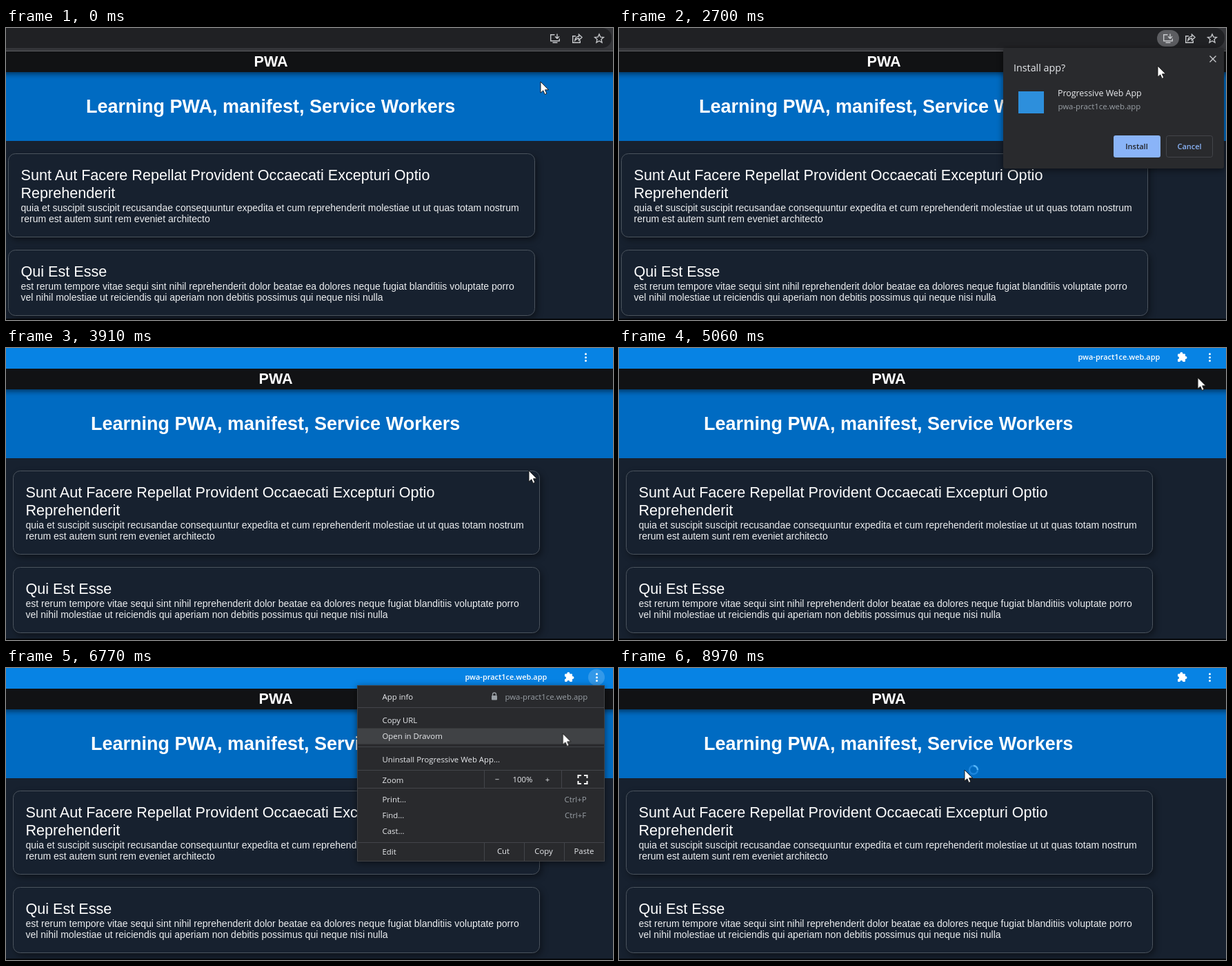
Animation, 880 px wide and 424 px high, one loop 9000 ms. Source, as an HTML page:

```html
<!DOCTYPE html>
<html lang="en">
<head>
<meta charset="utf-8">
<title>PWA install</title>
<style>
html, body { margin: 0; width: 100%; height: 100%; overflow: hidden; background: #17212f; }
svg { display: block; width: 880px; height: 424px; }
text { white-space: pre; }
.page text { font-family: "Liberation Sans", Arial, sans-serif; fill: #fff; }
.page .brand { font-size: 21.6px; font-weight: 700; }
.page .hero { font-size: 27px; font-weight: 700; }
.page .title { font-size: 21.6px; }
.page .body { font-size: 14.02px; fill: #eceef0; }
.bar { fill: #111214; filter: drop-shadow(0 2px 4px rgba(0, 0, 0, .6)); }
.card { fill: #17212f; stroke: #4b545e; filter: drop-shadow(3px 4px 5px rgba(0, 0, 0, .4)); }
.ui text { font-family: "Open Sans", "Noto Sans", sans-serif; font-size: 11.4px; fill: #e8eaed; }
.ui .head { font-size: 14.3px; }
.ui .name { font-size: 12.4px; }
.ui .dim { fill: #9aa0a6; }
.ui .btn { font-weight: 600; font-size: 11px; text-anchor: middle; }
.ui .mid { text-anchor: middle; }
.ui .blue { fill: #8ab4f8; }
.ui .dark { fill: #202124; }
.panel { fill: #292a2d; filter: drop-shadow(0 2px 5px rgba(0, 0, 0, .55)); }
.line { fill: none; stroke: #43454a; }
.icon { fill: none; stroke: #c6c8cb; stroke-width: 1.4; }
</style>
</head>
<body>
<svg viewBox="0 0 880 424">
  <g id="browser">
    <g id="page" class="page">
      <rect x="-10" y="20" width="900" height="420" fill="#17212f"/>
      <rect x="-10" y="60" width="900" height="104" fill="#006bc2"/>
      <rect class="bar" x="-20" y="34" width="920" height="30"/>
      <text class="brand" x="359.5" y="56">PWA</text>
      <text class="hero" x="116" y="123">Learning PWA, manifest, Service Workers</text>
      <rect class="card" x="3.5" y="182.5" width="763" height="121" rx="10"/>
      <text class="title" x="21.5" y="221">Sunt Aut Facere Repellat Provident Occaecati Excepturi Optio</text>
      <text class="title" x="21.5" y="247">Reprehenderit</text>
      <text class="body" x="21.5" y="266">quia et suscipit suscipit recusandae consequuntur expedita et cum reprehenderit molestiae ut ut quas totam nostrum</text>
      <text class="body" x="21.5" y="282">rerum est autem sunt rem eveniet architecto</text>
      <rect class="card" x="3.5" y="322.5" width="763" height="95" rx="10"/>
      <text class="title" x="21.5" y="361">Qui Est Esse</text>
      <text class="body" x="21.5" y="380">est rerum tempore vitae sequi sint nihil reprehenderit dolor beatae ea dolores neque fugiat blanditiis voluptate porro</text>
      <text class="body" x="21.5" y="396">vel nihil molestiae ut reiciendis qui aperiam non debitis possimus qui neque nisi nulla</text>
    </g>
    <rect width="880" height="34" fill="#35363a"/>
    <rect x="-20" y="0" width="898" height="29" rx="14" fill="#202124"/>
    <rect width="860" height="10" fill="#202124"/>
    <rect y="33" width="880" height="1" fill="#5b5c60"/>
    <rect id="pill" x="780" y="3" width="32" height="24" rx="12" fill="#5c5d61"/>
    <g class="icon">
      <path d="M795.5 9.7H789.7V18.8H802.3V15.5M792.5 21.3H799.5M799 8.5V15M796 12.2L799 15.2L802 12.2"/>
      <path d="M826 11.7H821.7V21.3H832.3V18M824.8 18C825 14.5 827.5 12.3 830.5 12.3V9.3L835 13.6L830.5 17.8V15C828 15 826.3 16 824.8 18Z"/>
      <path d="M860 9L861.9 13.2L866.4 13.6L863 16.6L864 21.1L860 18.7L856 21.1L857 16.6L853.6 13.6L858.1 13.2Z"/>
    </g>
    <g id="popup" class="ui">
      <rect class="panel" x="557" y="29" width="320" height="175" rx="3"/>
      <text class="head" x="572" y="63">Install app?</text>
      <path class="icon" d="M856.5 40.5L865.5 49.5M865.5 40.5L856.5 49.5"/>
      <rect x="579" y="92" width="37" height="32" fill="#2d8fdc"/>
      <text class="name" x="636" y="99">Progressive Web App</text>
      <text class="dim" x="636.5" y="118">pwa-pract1ce.web.app</text>
      <rect x="717" y="156" width="68" height="32" rx="3" fill="#8ab4f8"/>
      <text class="btn dark" x="750.5" y="176">Install</text>
      <rect class="line" x="793.5" y="156.5" width="67" height="31" rx="3"/>
      <text class="btn blue" x="827" y="176">Cancel</text>
    </g>
  </g>

  <g id="app">
    <use href="#page" transform="translate(7 -4)"/>
    <rect width="880" height="30" fill="#0783e4"/>
    <text/>
    <g class="ui">
      <text id="origin" x="665.5" y="17" style="font-weight:600;font-size:10.95px;fill:#fff">pwa-pract1ce.web.app</text>
      <g id="puzzle" fill="#fff">
        <rect x="810" y="8.5" width="11" height="11.5" rx="1"/>
        <circle cx="815.3" cy="8" r="2.1"/>
        <circle cx="821.4" cy="14" r="2.1"/>
        <circle cx="810" cy="14.3" r="2" fill="#0783e4"/>
        <circle cx="815.3" cy="20" r="2" fill="#0783e4"/>
      </g>
      <circle id="halo" cx="856" cy="13.5" r="12" fill="#fff" fill-opacity=".18"/>
      <g id="dots" fill="#fff">
        <circle cx="856.5" cy="8.8" r="1.5"/>
        <circle cx="856.5" cy="13.7" r="1.5"/>
        <circle cx="856.5" cy="18.6" r="1.5"/>
      </g>
    </g>

    <g id="menu" class="ui">
      <rect class="panel" x="509.5" y="25.5" width="358" height="255" stroke="#3f4145"/>
      <rect id="hover" x="510" width="357" height="23" fill="#404245"/>
      <path class="line" d="M510 57.5H867M510 114.5H867M510 148.5H867M510 174.5H867M510 253.5H867M693.5 149V174M805.5 149V174M693.5 254V280M751.5 254V280M809.5 254V280"/>
      <text x="545.5" y="46">App info</text>
      <path d="M705.5 40V38.5A2.5 2.5 0 0 1 710.5 38.5V40" fill="none" stroke="#9aa0a6" stroke-width="1.3"/>
      <rect x="704" y="40" width="8" height="6.5" rx="1" fill="#9aa0a6"/>
      <text class="dim" x="723.5" y="46">pwa-pract1ce.web.app</text>
      <text x="545.5" y="80">Copy URL</text>
      <text x="545.5" y="103">Open in Dravom</text>
      <text x="545.5" y="137">Uninstall Progressive Web App...</text>
      <text x="545.5" y="167">Zoom</text>
      <text class="mid" x="712" y="166">−</text>
      <text class="mid" x="749" y="166">100%</text>
      <text class="mid" x="785" y="166">+</text>
      <path d="M829.5 160V156H834M838 156H842.5V160M842.5 164V168H838M834 168H829.5V164" fill="none" stroke="#fff" stroke-width="2"/>
      <text x="545.5" y="195">Print...</text>
      <text class="dim" x="809.5" y="194.5">Ctrl+P</text>
      <text x="545.5" y="218">Find...</text>
      <text class="dim" x="810" y="217.5">Ctrl+F</text>
      <text x="545.5" y="241">Cast...</text>
      <text x="545.5" y="271">Edit</text>
      <text class="mid" x="721" y="270">Cut</text>
      <text class="mid" x="779.5" y="270">Copy</text>
      <text class="mid" x="838" y="270">Paste</text>
    </g>

    <g id="dialog" class="ui">
      <rect class="panel" x="176" y="27" width="448" height="145.5" rx="4"/>
      <rect x="196" y="49" width="24" height="20" fill="#2d8fdc"/>
      <text class="head" x="239" y="65">Remove "Progressive Web App"?</text>
      <rect x="242.5" y="90.5" width="11" height="11" fill="none" stroke="#9aa0a6"/>
      <text x="268" y="101">Also clear data from Dravom (pwa-pract1ce.web.app)</text>
      <rect x="447.7" y="124.7" width="76.6" height="32.6" rx="4" fill="#202124" stroke="#8ab4f8" stroke-width="1.6"/>
      <rect x="450" y="127" width="72" height="28" rx="2" fill="#8ab4f8"/>
      <text class="btn dark" x="486" y="145">Remove</text>
      <rect class="line" x="532.5" y="125.5" width="75" height="31" rx="3"/>
      <text class="btn blue" x="570" y="145">Cancel</text>
    </g>
  </g>

  <rect y="422" width="880" height="2" fill="#05070a"/>

  <g id="cursor">
    <path d="M0 0V16.2L3.8 12.8L6.2 18.4L8.9 17.2L6.5 11.8H11.6Z" fill="#fff" stroke="#111" stroke-width=".9"/>
    <g id="busy" fill="none" stroke-width="2.4">
      <circle cx="13" cy="0" r="6" stroke="#1d86dd"/>
      <path d="M13 -6A6 6 0 0 1 19 0" stroke="#55b5f7"/>
    </g>
  </g>
</svg>
<script>
const LOOP = 9000;
const el = id => document.getElementById(id);

function play(id, steps, toStyle, easing) {
  const all = [[0, ...steps[0].slice(1)], ...steps, [LOOP, ...steps.at(-1).slice(1)]];
  const frames = all.map(([t, ...v]) => ({ offset: t / LOOP, easing, ...toStyle(...v) }));
  el(id).animate(frames, { duration: LOOP, iterations: Infinity });
}
const fade = (id, ...steps) => play(id, steps, opacity => ({ opacity }), 'linear');
const move = (id, easing, ...steps) =>
  play(id, steps, (x, y) => ({ transform: `translate(${x}px, ${y}px)` }), easing);

// Visible from `on` to `off`, with fade times in ms
const show = (id, on, off, fadeIn = 0, fadeOut = 0) =>
  fade(id, [on, 0], [on + fadeIn, 1], [off, 1], [off + fadeOut, 0]);

move('cursor', 'ease-in-out',
  [940, 775, 78], [1400, 791, 33], [1460, 791, 33], [1720, 795, 13], [2060, 795, 13],
  [2600, 781, 55], [2770, 781, 55], [3350, 758, 178], [4470, 758, 178],
  [5300, 856, 15], [6400, 856, 15], [7000, 786, 130], [7480, 786, 130], [8400, 501, 148]);

show('pill', 1660, 3600);
show('popup', 1980, 3580, 90, 80);
fade('app', [3720, 0], [3850, 1]);
move('dots', 'ease-out', [3930, -16, 0], [4200, 0, 0]);
fade('puzzle', [3980, 0], [4200, 1]);
show('origin', 4020, 8240, 230, 260);
show('halo', 5230, 7330, 60, 40);
show('menu', 5450, 7300, 60, 40);
move('hover', 'step-end',
  [6559, 0, -100], [6560, 0, 30.5], [6670, 0, 64.5], [6750, 0, 87.5], [6880, 0, 121.5]);
show('dialog', 7310, 8860, 80, 95);
fade('busy', [8860, 0], [8860, 1]);
</script>
</body>
</html>
```
